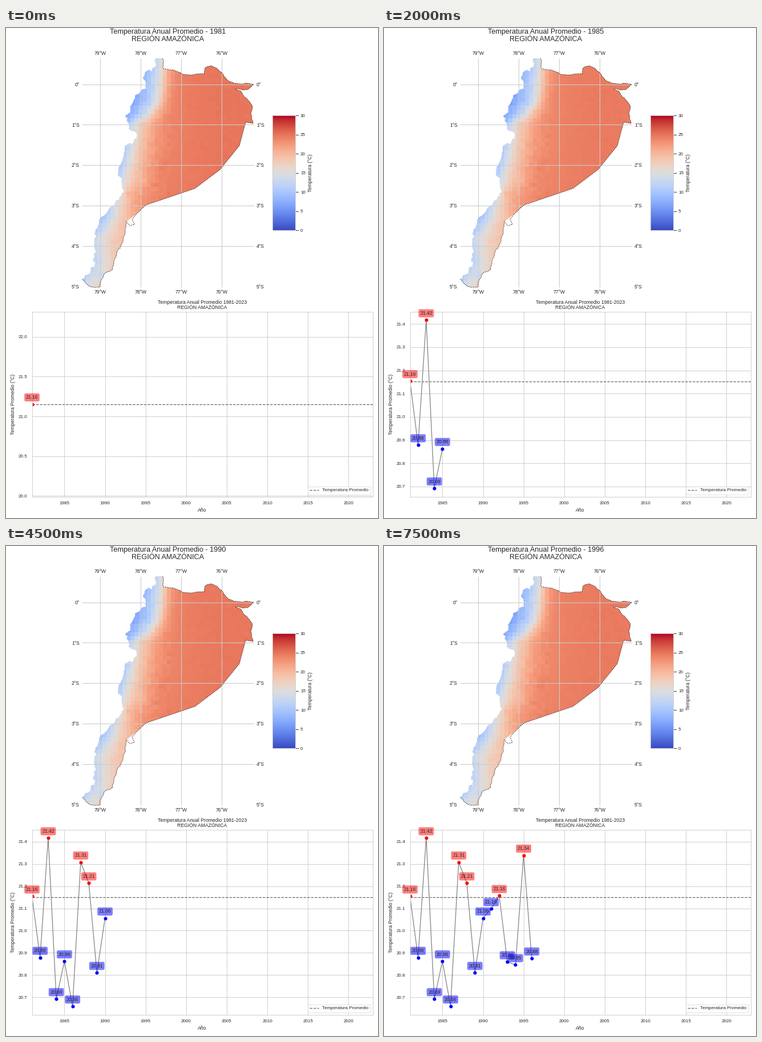
These frames come from a looping animation (652 by 858 pixels, 8 s). A matplotlib script:

```python
import matplotlib.pyplot as plt
import numpy as np
from matplotlib.animation import FuncAnimation
from matplotlib.patches import Polygon, Rectangle
from matplotlib.ticker import FormatStrFormatter, MultipleLocator

W, H, DPI = 652, 858, 52
START, MEAN = 1981, 21.151
VALUES = np.array([21.155, 20.879, 21.417, 20.693, 20.863, 20.660, 21.308, 21.214,
                   20.811, 21.056, 21.098, 21.157, 20.859, 20.846, 21.339, 20.876])
YEARS = START + np.arange(len(VALUES))
INK, GRID = "0.15", "0.8"
TICK, LABEL, TITLE = 11, 12, 17.5

plt.rcParams.update({"font.family": "Liberation Sans", "text.color": INK,
                     "axes.labelcolor": INK, "xtick.color": INK, "ytick.color": INK})
rng = np.random.default_rng(4)

# Map geometry, in stage pixels
LON0, LAT0, DEG = 236, 98.6, 70.87      # position of 78°W and 0°, size of a degree
LEFT, RIGHT, TOP, BOTTOM = 134, 434, 53.5, 453

# Corner points of the outline, anticlockwise from the top
WEST = [(262, 53), (256, 76), (240, 86), (245, 98), (226, 118), (218, 147), (209, 155),
        (215, 176), (227, 182), (229, 192), (222, 203), (208, 206), (204, 230),
        (196, 258), (203, 272), (206, 287), (198, 300), (163, 337), (155, 361),
        (157, 390), (153, 404), (156, 418), (134, 440)]
SOUTH = [(134, 440), (146, 452), (165, 453), (171, 431), (187, 423), (190, 405),
         (209, 360), (211, 339)]
LOOP = [(217, 346), (225, 344), (221, 335)]
FRONTIER = [(228, 326), (245, 310), (331, 281), (375, 248), (409, 206), (420, 165)]
NORTH = [(433, 167), (429, 150), (432, 138), (414, 114), (403, 107), (424, 108),
         (434, 99), (412, 98), (390, 93), (378, 78), (362, 67), (350, 69), (347, 80),
         (309, 81), (295, 74), (276, 71), (274, 53)]


def rough(points, amount, depth=3):
    """Fractal coast: insert randomly shifted midpoints, a few times over."""
    points = [np.array(p, float) for p in points]
    for _ in range(depth):
        out = points[:1]
        for a, b in zip(points, points[1:]):
            shift = rng.normal(0, amount, 2) * min(np.hypot(*(b - a)), 18)
            out += [(a + b) / 2 + shift, b]
        points = out
    return points


def temperature_field():
    """Logistic rise from cold highlands to warm lowlands across the foothills."""
    cell = DEG / 10
    cols, rows = np.arange(-15, 29), np.arange(-7, 51)
    gx, gy = LON0 + cell * cols, LAT0 + cell * rows
    x, y = np.meshgrid(gx, gy)

    foot = np.interp(y, [60, 130, 152, 170, 220, 290, 330, 370, 410, 447],
                     [276, 268, 252, 232, 225, 206, 192, 160, 165, 143])
    warm_width = np.interp(y, [130, 180], [9, 19])
    u = (x - foot) / np.where(x < foot, 17, warm_width)
    low, high = 5, np.interp(y, [310, 360], [24.3, 20])
    field = low + (high - low) / (1 + np.exp(-u - 0.28))

    # Local ridges and valleys: x, y, radius, amplitude
    for cx, cy, r, amp in [(240, 268, 9, -1.3), (217, 289, 6, 1.6), (170, 434, 8, -3)]:
        field += amp * np.exp(-((x - cx) ** 2 + (y - cy) ** 2) / (2 * r * r))
    field += 0.4 * np.clip((x - 300) / 80, 0, 1)
    field += rng.normal(0, 1, field.shape) * np.where(x < 290, 0.25, 0.06)
    half = cell / 2
    return field, (gx[0] - half, gx[-1] + half, gy[-1] + half, gy[0] - half)


fig = plt.figure(figsize=(W / DPI, H / DPI), dpi=DPI, facecolor="white")

# Map and colour bar
stage = fig.add_axes([0, 0, 1, 1])
stage.axis("off")


def put(x, y, text, size=LABEL, ha="center"):
    """Text whose capitals are centred on y."""
    drop = 0.36 * size * DPI / 72
    return stage.text(x, y + drop, text, size=size, ha=ha, va="baseline")


def put_upright(x, y, text):
    stage.text(x, y, text, size=LABEL, rotation=90, ha="center", va="center")


def rule(xs, ys, color=GRID, lw=1.5):
    stage.plot(xs, ys, color=color, lw=lw, zorder=2)


field, extent = temperature_field()
west, south, north = rough(WEST, 0.13), rough(SOUTH, 0.08), rough(NORTH, 0.07)
color = dict(cmap="coolwarm", vmin=0, vmax=30, aspect="auto", zorder=1)
raster = stage.imshow(field, extent=extent, interpolation="nearest", **color)
raster.set_clip_path(Polygon(west + south + FRONTIER + north, transform=stage.transData))
border = np.array(south + LOOP + FRONTIER + north)
stage.plot(*border.T, color="black", lw=1.6, ls=":", zorder=3)

BAR_X, BAR_Y, BAR_W, BAR_H = 467, 153, 40, 201
stage.imshow(np.linspace(30, 0, 256)[:, None],
             extent=(BAR_X, BAR_X + BAR_W, BAR_Y + BAR_H, BAR_Y), **color)
stage.add_patch(Rectangle((BAR_X, BAR_Y), BAR_W, BAR_H, fill=False, ec=GRID, lw=1.25))
for t in range(0, 31, 5):
    y = BAR_Y + BAR_H * (1 - t / 30)
    rule([508, 512], [y, y], INK, 1.25)
    put(516, y, t, TICK, ha="left")
put_upright(533, 254, "Temperatura (°C)")
stage.set(xlim=(0, W), ylim=(H, 0))

for lon in range(-79, -75):
    x = LON0 + DEG * (lon + 78)
    rule([x, x], [TOP, BOTTOM])
    for y in (44, 462):
        put(x, y, f"{-lon}°W")
for lat in range(6):
    y = LAT0 + DEG * lat
    if y < BOTTOM - 1:
        rule([LEFT, RIGHT], [y, y])
    name = f"{lat}°S" if lat else "0°"
    put(LEFT - 5, y, name, ha="right")
    put(RIGHT + 5, y, name, ha="left")

title = put(284, 5, "", TITLE)
put(284, 18.7, "REGIÓN AMAZÓNICA", TITLE)
put(344, 480, "Temperatura Anual Promedio 1981-2023")
put(344, 489, "REGIÓN AMAZÓNICA")

# Yearly chart
X0, X1, Y0, Y1 = 45.5, 643, 496.5, 820.5
chart = fig.add_axes([X0 / W, 1 - Y1 / H, (X1 - X0) / W, (Y1 - Y0) / H])
chart.set_xlim(START, 2023)
chart.set_xticks(range(1985, 2021, 5))
chart.yaxis.set_major_formatter(FormatStrFormatter("%.1f"))
chart.tick_params(length=0, pad=11.5, labelsize=TICK)
chart.grid(color=GRID, lw=1.3)
chart.set_axisbelow(True)
for spine in chart.spines.values():
    spine.set(color=GRID, lw=1.25)
put(344, 844, "Año")
put_upright(12.5, 658.5, "Temperatura Promedio (°C)")

chart.axhline(MEAN, color="0.4", ls="--", lw=1.7, label="Temperatura Promedio")
line, = chart.plot([], [], color="gray", lw=1.7)
dots = {c: chart.plot([], [], "o", color=c, ms=8.5, mew=0)[0] for c in ("red", "blue")}
chart.legend(loc="lower right", fontsize=TICK, edgecolor=GRID)

tints = np.where(VALUES > MEAN, "red", "blue")
tags = [chart.annotate(f"{v:.2f}", (x, v), xytext=(0, 10), textcoords="offset points",
                       ha="center", va="bottom", size=LABEL, annotation_clip=False,
                       bbox=dict(boxstyle="round,pad=0.3", fc=c, ec="none", alpha=0.5))
        for x, v, c in zip(YEARS, VALUES, tints)]


def update(i):
    n = i + 1
    title.set_text(f"Temperatura Anual Promedio - {START + i}")
    raster.set_data(field + VALUES[i] - 21.0)

    years, values = YEARS[:n], VALUES[:n]
    line.set_data(years, values)
    for c, dot in dots.items():
        mask = tints[:n] == c
        dot.set_data(years[mask], values[mask])
    for k, tag in enumerate(tags):
        tag.set_visible(k < n)

    lo, hi = values.min(), values.max()
    if n == 1:
        lo, hi = 0.95 * lo, 1.05 * hi
    margin = 0.05 * (hi - lo)
    chart.set_ylim(lo - margin, hi + margin)
    chart.yaxis.set_major_locator(MultipleLocator(0.5 if hi - lo > 1 else 0.1))
    return []


anim = FuncAnimation(fig, update, frames=len(VALUES), init_func=lambda: update(0),
                     interval=500, repeat=True)
plt.show()
```
